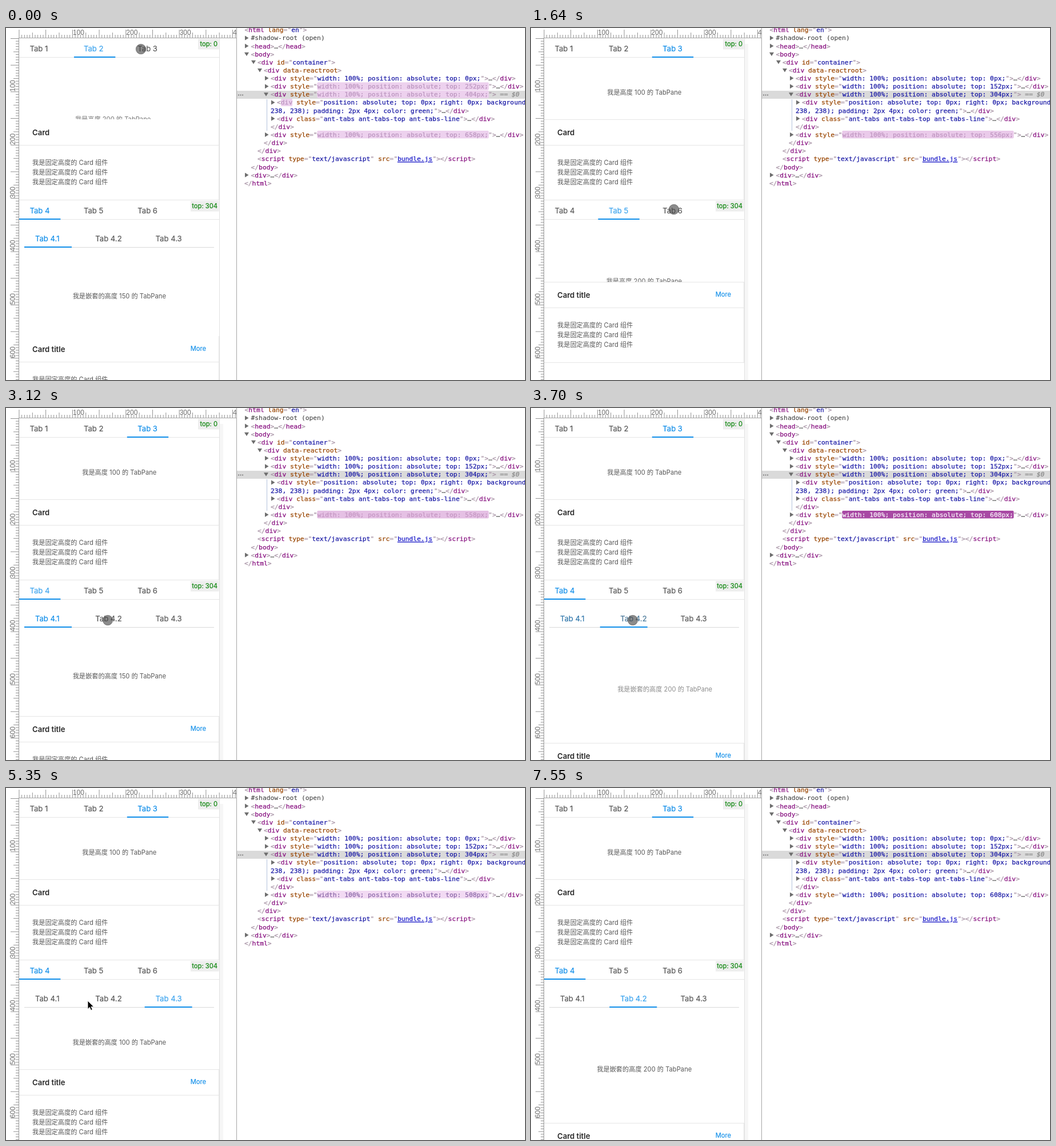
An HTML page that plays this animation: 908 px wide and 617 px high, repeating every 7650 ms.

```html
<!DOCTYPE html>
<html lang="en">
<head>
<meta charset="utf-8">
<title>Nested tabs and inspector</title>
<style>
html, body { margin: 0; width: 100%; height: 100%; overflow: hidden; background: #fff; }
svg { display: block; width: 908px; height: 617px; }
text { white-space: pre; font: 11.2px Inter, "Noto Sans CJK SC", "Noto Sans CJK", sans-serif; fill: #595959; }
.tab { font-size: 13.1px; stroke-width: .2; }
.title { font-size: 13.1px; font-weight: 600; fill: #262626; }
.mid { text-anchor: middle; }
.end { text-anchor: end; stroke-width: .15; }
.code { font: 11.3px "DejaVu Sans Mono", monospace; fill: #333; stroke-width: .25; }
.num { font: 12px "Liberation Sans", sans-serif; fill: #707070; }
</style>
</head>
<body>
<svg viewBox="0 0 908 617">
  <defs>
    <clipPath id="page"><rect x="23" y="18" width="350" height="599"/></clipPath>
    <clipPath id="nest"><rect x="32" y="340" width="332" height="277"/></clipPath>
  </defs>
  <g id="fixed"></g>
  <g id="live"></g>
</svg>
<script>
const LOOP = 7650, PAGE = 350, SCALE = 0.934;
const LINE = '#e6e6e6', GREY = [89, 89, 89], BLUE = [16, 142, 233], HOVER = [61, 164, 238];
const VALUE = [26, 26, 166], WHITE = [255, 255, 255];

// Runs of screen updates: first time, last time, count
const runs = [[0, 0, 1], [150, 1190, 8], [1340, 2240, 7], [2390, 3120, 6], [3410, 4450, 8],
  [4600, 4900, 3], [5350, 5800, 4], [6090, 6970, 7], [7260, 7260, 1], [7550, 7550, 1]];
const steps = runs.flatMap(([a, b, n]) =>
  Array.from({ length: n }, (_, i) => Math.ceil((a + (b - a) * i / Math.max(1, n - 1) - 2) / 10) * 10));

// Clicks: time, tab group, tab, resulting top of the last card
const clicks = [[-60, 0, 2, 558], [798, 1, 1, 556], [1620, 1, 2, 456], [2400, 1, 0, 558],
  [3350, 2, 1, 608], [4067, 2, 2, 508], [5970, 2, 1, 608]];
const first = [1, 0, 0], DOM_LAG = 170;

// Pointer: time, x, y
const path = [[0, 236, 37], [300, 236, 37], [800, 164, 316], [1150, 164, 316], [1550, 250, 318],
  [1850, 250, 318], [2390, 65.5, 318], [2500, 65.5, 318], [3120, 178, 372], [3600, 178, 372],
  [4000, 276, 370], [5340, 276, 370], [5500, 160, 372], [5800, 180, 370], [6600, 180, 370]];

const clamp = u => Math.min(1, Math.max(0, u));
const ease = u => u < 0.5 ? 4 * u ** 3 : 1 - 4 * (1 - u) ** 3;
const fade = u => 1 - (1 - u ** 1.3) ** 2.5;
const linear = u => u;
const mix = (a, b, u) => a.map((v, i) => v + (b[i] - v) * u);
const rgb = c => `rgb(${c.map(Math.round)})`;

const rect = (x, y, w, h, fill, more = '') =>
  `<rect x="${x}" y="${y}" width="${w}" height="${h}" fill="${fill}" ${more}/>`;
const text = (x, y, s, cls = '', more = '') => `<text x="${x}" y="${y}" class="${cls}" ${more}>${s}</text>`;
const ink = color => `style="fill:${color};stroke:${color}"`;
const span = (color, s, more = '') => `<tspan ${ink(color)} ${more}>${s.replace(/</g, '&lt;')}</tspan>`;

// Inspector text
const PUNCT = 'rgb(168,148,166)', TAG = 'rgb(136,18,128)', ATTR = 'rgb(153,69,0)', CHAR = 6.803;
const base = k => 7.3 + 14.13 * k;
const code = (s, color = rgb(VALUE)) => s.replace(/(<\/?)(\w+)|([\w-]+)="([^"]*)"|([\w-]+)(?=>)|>/g,
  (all, open, tag, attr, value, bare) =>
    open ? span(PUNCT, open) + span(TAG, tag)
    : attr ? span(ATTR, attr) + span(PUNCT, '="') + span(color, value) + span(PUNCT, '"')
    : bare ? span(ATTR, bare) : span(PUNCT, all));
const row = (x, k, s) => text(x, base(k), s, 'code');
const arrow = (x, k, open) => {
  const y = base(k) - 4;
  return `<path fill="#6e6e6e" d="${open ? `M${x - 1} ${y - 3}h8l-4 6.5z` : `M${x} ${y - 4}v8l6.5 -4z`}"/>`;
};

function ruler() {
  let s = rect(22, 17, 381, 1, '#aaa') + rect(22, 17, 1, 600, '#999');
  for (let v = 0; v <= 640; v += 5) {
    const p = v * SCALE, x = 22.5 + p, y = 18 + p;
    const len = v % 50 == 0 ? 14 : v % 25 == 0 ? 9 : 5;
    if (x < 403) s += rect(x, 17 - len, 0.9, len, '#888');
    s += rect(22 - len, y, len, 0.9, '#888');
    if (v && v % 100 == 0) {
      if (x < 403) s += text(x + 1, 12, v, 'num');
      s += text(0, 0, v, 'num', `transform="translate(15.5 ${y}) rotate(-90)"`);
    }
  }
  return s + rect(403, 0, 505, 617, '#fff') + rect(403, 0, 1, 617, '#a6a6a6');
}

function inspector() {
  let s = rect(404, 110, 504, 14, '#dadada') + rect(456, 125, 1, 55, '#b4c3dd');
  for (const x of [407, 410.5, 414]) s += `<circle cx="${x}" cy="117.5" r="1.1" fill="#777"/>`;
  [[418, 1], [418, 2], [418, 3, 1], [430, 4, 1], [441, 5, 1], [453, 6], [453, 7], [452, 8, 1],
    [464, 9], [464, 11], [453, 13], [418, 18]].forEach(a => s += arrow(...a));
  s += row(428.5, 1, '#shadow-root (open)');
  [[417.5, 0, '<html lang="en">'], [428.5, 2, '<head>…</head>'], [428.5, 3, '<body>'],
    [440, 4, '<div id="container">'], [451, 5, '<div data-reactroot>'],
    [463, 6, '<div style="width: 100%; position: absolute; top: 0px;">…</div>'],
    [474, 9, '<div style="position: absolute; top: 0px; right: 0px; background: rgb(238,"'],
    [474, 11, '<div class="ant-tabs ant-tabs-top ant-tabs-line">…</div>'],
    [463, 12, '</div>'], [451, 14, '</div>'], [440, 15, '</div>'], [428.5, 17, '</body>'],
    [428.5, 18, '<div>…</div>'], [417, 19, '</html>']
  ].forEach(([x, k, src]) => s += row(x, k, code(src)));
  s += row(463, 10, span(rgb(VALUE), '238, 238); padding: 2px 4px; color: green;') + span(PUNCT, '"') + code('>…</div>'));
  return s + row(440, 16, code('<script type="text/javascript" ') + span(ATTR, 'src') + span(PUNCT, '="') +
    span('rgb(26,26,200)', 'bundle.js', 'text-decoration="underline"') + span(PUNCT, '"') + code('><\/script>'));
}

// Flash of a changed value
function flashBack(age, under) {
  const c = mix([158, 54, 153], [245, 224, 246], 1 - Math.exp(-age / 330));
  return rgb(mix(c, under, clamp((age - 1120) / 280)));
}
function flashText(age) {
  const stops = [[0, WHITE], [550, [196, 150, 194]], [800, [186, 148, 190]], [1110, [140, 105, 168]], [1400, VALUE]];
  const i = stops.findIndex(p => age < p[0]);
  if (i < 1) return rgb(VALUE);
  const [a, b] = [stops[i - 1], stops[i]];
  return rgb(mix(a[1], b[1], (age - a[0]) / (b[0] - a[0])));
}
function styleRow(k, top, age) {
  const under = k == 8 ? [218, 218, 218] : WHITE;
  const back = age < 1400 ? rect(544.3, base(k) - 10.9, 300.3, 13.5, flashBack(age, under), 'rx="2"') : '';
  const tail = k == 8 ? span('#888', ' == $0', 'font-style="italic"') : code('…</div>');
  return back + row(463, k, code(`<div style="width: 100%; position: absolute; top: ${top}px;">`, flashText(age)) + tail);
}
function styleRows(t) {
  const done = clicks.filter(c => t >= c[0] + DOM_LAG);
  const since = c => t - (c ? c[0] + DOM_LAG : -800);
  const last = done[done.length - 1], moved = done.length > 0, age = since(done[0]);
  let s = styleRow(7, moved ? 152 : 252, age) + styleRow(8, moved ? 304 : 404, age) +
    styleRow(13, last ? last[3] : 658, since(last));
  if (age < 1400) s += rect(474 + CHAR, base(9) - 10.5, 3 * CHAR, 13, flashBack(age, WHITE), 'rx="2"') +
    row(474 + CHAR, 9, span(flashText(age), 'div'));
  return s;
}

// A value that chases the chosen tab of a group
const follow = (g, t, goal, delay, dur, curve) => clicks.filter(c => c[1] == g).reduce(
  (v, c) => v + (goal(c[2]) - v) * curve(clamp((t - c[0] - delay) / dur)), goal(first[g]));
const slide = (g, t) => follow(g, t, i => i, 0, 300, ease);
const shown = (g, t, tab) => follow(g, t, i => +(i == tab), 0, 450, fade);

function tabs(g, t, x, y, names, pad, pitch, inkW, lineW) {
  const hot = clicks.filter(c => t >= c[0] + 80).pop() || [0, 0, 1];
  let s = rect(x, y, lineW, 1, g == 2 ? '#d9d9d9' : LINE);
  names.forEach((name, i) => {
    const on = follow(g, t, k => +(k == i), 80, 300, linear);
    const blue = hot[1] == g && hot[2] == i ? HOVER : BLUE;
    s += text(x + pad + pitch * i, y - 10.5, name, 'tab', ink(rgb(mix(GREY, blue, on))));
  });
  const pos = follow(g, t, i => i, 12, 300, ease);
  return s + rect(x + pitch * pos, y - 1, inkW, 2, rgb(BLUE));
}

const pane = (g, t, i, width, inner) =>
  `<g transform="translate(${width * (i - slide(g, t))} 0)" opacity="${shown(g, t, i)}">${inner}</g>`;
const paneText = (y, h, kind = '') => text(198.3, y + 19 + h * SCALE / 2, `我是${kind}高度 ${h} 的 TabPane`, 'mid');

function card(y, title, edge, more) {
  let s = rect(23, y, PAGE, 142, '#fff') + rect(23, y + 45, PAGE, 1, LINE) + rect(23, y + 141, PAGE, 1, LINE) +
    rect(372, y, 1, 142, LINE) + text(46, y + 27.8, title, 'title');
  if (edge) s += rect(23, y, PAGE, 1, LINE);
  for (let i = 0; i < 3; i++) s += text(46, y + 80.2 + 17 * i, '我是固定高度的 Card 组件');
  return s + (more ? text(350, y + 26, 'More', 'end', ink(rgb(BLUE))) : '');
}

const badge = (x, y, s) => rect(x, y, 372.5 - x, 18.5, '#eee') +
  text(370, y + 13.4, s, 'end', ink('#008000'));

function page(t) {
  const top = clicks.filter(c => t >= c[0]).pop()[3];
  const edge = t >= 1340;
  const nested = tabs(2, t, 32, 384, ['Tab 4.1', 'Tab 4.2', 'Tab 4.3'], 19, 105.3, 83, 332) +
    `<g clip-path="url(#nest)">${[150, 200, 100].map((h, i) =>
      pane(2, t, i, 332, paneText(384.5, h, '嵌套的'))).join('')}</g>`;
  let s = [100, 200, 100].map((h, i) => pane(0, t, i, PAGE, paneText(51.5, h))).join('');
  s += tabs(0, t, 23, 51, ['Tab 1', 'Tab 2', 'Tab 3'], 18.5, 94.4, 72.4, PAGE) + badge(336, 19, 'top: 0');
  s += card(160, 'Card', edge) + rect(23, 302, PAGE, 315, '#fff');
  s += [nested, paneText(335.5, 200), paneText(335.5, 100)].map((p, i) => pane(1, t, i, PAGE, p)).join('');
  s += tabs(1, t, 23, 335, ['Tab 4', 'Tab 5', 'Tab 6'], 18.5, 94.4, 72.4, PAGE) + badge(323, 303, 'top: 304');
  s += card(Math.round(18.8 + top * SCALE), 'Card title', edge, true);
  const strip = t >= 1050 ? rect(374, 28, 6, 589, '#f6f6f6') : '';
  return `<g clip-path="url(#page)">${s}</g>` + rect(373, 18, 1, 599, '#e2e2e2') + strip;
}

function pointer(t) {
  if (t >= 5350 && t < 5500)
    return '<path d="M143 373v14.5l3.4-3.2 2.3 5.2 2.5-1.1-2.3-5h4.5z" fill="#000" stroke="#fff" stroke-width=".8"/>';
  const i = path.findIndex(p => t < p[0]);
  if (i < 1) return '';
  const [a, b] = [path[i - 1], path[i]];
  const [, x, y] = mix(a, b, ease((t - a[0]) / (b[0] - a[0])));
  return `<circle cx="${x}" cy="${y}" r="8.7" fill="#444" fill-opacity=".62" stroke="#555" stroke-opacity=".6"/>`;
}

const live = document.getElementById('live');
let current = -1;
function draw(now) {
  const time = now % LOOP;
  const t = steps.filter(v => v <= time).pop();
  if (t === current) return;
  current = t;
  live.innerHTML = page(t) + styleRows(t) + pointer(t);
}

document.getElementById('fixed').innerHTML = ruler() + inspector();
function tick(now) {
  draw(now);
  requestAnimationFrame(tick);
}
draw(0);
requestAnimationFrame(tick);
</script>
</body>
</html>
```
